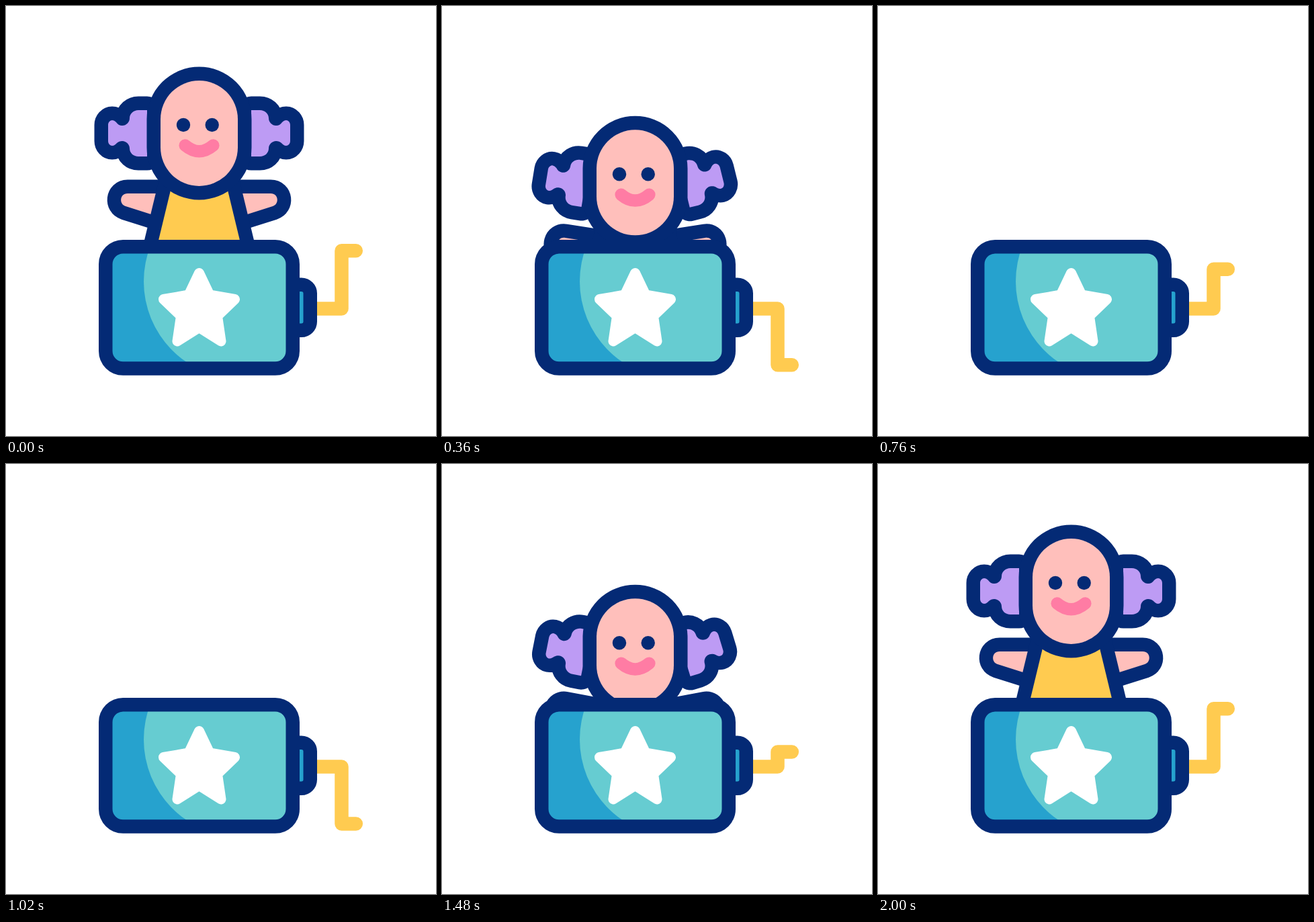
An HTML page that plays this animation: 640 px wide and 640 px high, repeating every 2400 ms.

```html
<!DOCTYPE html>
<html lang="en">
<head>
<meta charset="utf-8">
<title>Jack in the box</title>
<style>
  html, body { margin: 0; width: 100%; height: 100%; overflow: hidden; background: #fff; }
  svg { display: block; width: 100%; height: 100%; }
  .outlined { stroke: #042a75; stroke-width: 41; stroke-linejoin: round; paint-order: stroke; }
  .line { stroke: #042a75; stroke-width: 20.5; }
</style>
</head>
<body>
<svg viewBox="0 0 640 640">
  <defs>
    <clipPath id="aboveBox"><rect width="640" height="370"/></clipPath>
    <clipPath id="boxFront"><rect x="148.25" y="358.25" width="278.5" height="181.25" rx="26"/></clipPath>
    <path id="hair" d="M210 155H197C190 155 184 160 184 167C184 173 179 178 173 178C169 178 166 176 164 173C162 171 160 170 158 170C155 170 152 173 152 177V201C152 205 155 208 158 208C161 208 163 206 165 204C167 202 170 201 173 201C179 201 184 206 184 212C184 219 190 224 197 224H210Z"/>
    <path id="arm" d="M230 279H181C169 279 168 295 178 298L222 312Z"/>
  </defs>

  <g clip-path="url(#aboveBox)">
    <g id="doll">
      <g class="outlined" fill="#ffbfbb">
        <use id="armLeft" href="#arm"/>
        <g transform="matrix(-1 0 0 1 575 0)"><use id="armRight" href="#arm"/></g>
      </g>
      <path class="outlined" fill="#ffcb50" d="M247 266L214.6 400H360.4L328 266Z"/>
      <g class="outlined" fill="#bd9bf4">
        <use id="hairLeft" href="#hair"/>
        <g transform="matrix(-1 0 0 1 575 0)"><use id="hairRight" href="#hair"/></g>
      </g>
      <rect class="outlined" x="230" y="111" width="115" height="157" rx="57.5" fill="#ffbfbb"/>
      <g fill="#042a75">
        <circle cx="264" cy="177" r="10.2"/>
        <circle cx="306.7" cy="177" r="10.2"/>
      </g>
      <path d="M266.7 207.5Q287.5 225 308.3 207.5" fill="none" stroke="#ff7ca4" stroke-width="18.5" stroke-linecap="round"/>
    </g>
  </g>

  <path id="crank" fill="none" stroke="#ffcb50" stroke-width="20.5" stroke-linecap="round" stroke-linejoin="round"/>
  <rect class="line" x="400" y="414.75" width="52.75" height="68" rx="13" fill="#26a2ce"/>

  <g clip-path="url(#boxFront)">
    <rect x="148" y="358" width="279" height="182" fill="#26a2ce"/>
    <circle cx="350" cy="410" r="145" fill="#66ccd1"/>
  </g>
  <rect class="line" x="148.25" y="358.25" width="278.5" height="181.25" rx="26" fill="none"/>
  <path d="M287.5 397.5L303 430L340.5 436.5L314.5 461.5L320 499L287.5 478.5L255 499L260.5 461.5L234.5 436.5L272 430Z"
    fill="#fff" stroke="#fff" stroke-width="15" stroke-linejoin="round"/>
</svg>
<script>
  const LOOP = 2400, STEP = 20, DEPTH = 270;
  const turns = [0, 343, 670, 1024, 1343, 1672, 2000];
  const $ = id => document.getElementById(id);
  const clamp = v => Math.min(1, Math.max(0, v));
  const smooth = u => u * u * (3 - 2 * u);

  // Symmetric cubic bezier (p, 0, 1 - p, 1), solved for x by bisection.
  function ease(x, p = 0.745) {
    let lo = 0, hi = 1;
    for (let i = 0; i < 24; i++) {
      const s = (lo + hi) / 2, r = 1 - s;
      const bx = 3 * p * s * r * r + 3 * (1 - p) * s * s * r + s * s * s;
      if (bx < x) lo = s; else hi = s;
    }
    return smooth((lo + hi) / 2);
  }

  function dropAt(t) {
    return DEPTH * (t < 845 ? ease(clamp(t / 837)) : 1 - ease(clamp((t - 850) / 1150)));
  }

  function handleY(t) {
    if (t >= 2000) return 364.2;
    const i = turns.findIndex((_, k) => t < turns[k + 1]);
    const u = smooth((t - turns[i]) / (turns[i + 1] - turns[i]));
    return 364.2 + 171.3 * (i % 2 ? 1 - u : u);
  }

  function rotate(id, angle, x, y) {
    $(id).setAttribute("transform", `rotate(${angle} ${x} ${y})`);
  }

  function render(t) {
    const drop = dropAt(t);
    $("doll").setAttribute("transform", `translate(0 ${drop})`);
    rotate("hairLeft", drop * 0.126, 198, 210);
    rotate("hairRight", drop * 0.19, 198, 210);
    rotate("armLeft", drop * 0.12, 230, 290);
    rotate("armRight", drop * 0.12, 230, 290);
    $("crank").setAttribute("d", `M445 450.5H499.5V${handleY(t)}H520.8`);
  }

  const start = performance.now();
  function tick() {
    const t = (performance.now() - start) % LOOP;
    render(Math.floor(t / STEP) * STEP);
    requestAnimationFrame(tick);
  }
  render(0);
  requestAnimationFrame(tick);
</script>
</body>
</html>
```
